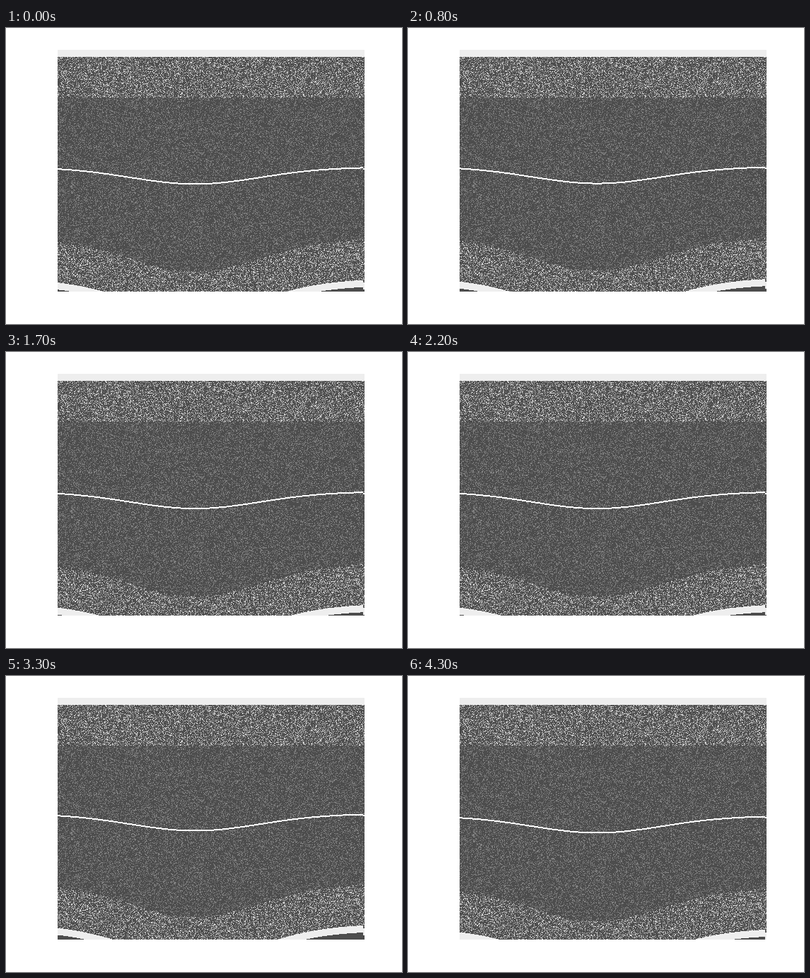
These frames come from a looping animation (560x420 px, 4400 ms). A matplotlib script:

```python
import numpy as np
import matplotlib.pyplot as plt
from matplotlib.animation import FuncAnimation

W, H, DPI = 560, 420, 100
LEFT, RIGHT, TOP, BOTTOM = 73, 507, 31, 374
WALL_TOP, LUMEN_TOP, BAND = 41, 99, 10
DARK, LIGHT = 77, 238
STEP = 0.75        # lower wall travel per level, in pixels
REST_LEVEL = 5
BEAT = 30          # frames per heartbeat

x = np.arange(LEFT, RIGHT)
y = np.arange(TOP, BOTTOM)[:, None]

# Resting centre line of the vessel: a smooth sag
centre = 197.5 + 23.8 * np.exp(-((x - 267) / 131) ** 2)
centre[-2:] = centre[0]  # the last column wraps round

speckle = np.random.default_rng(4).random((H, len(x)))
wall_tone = DARK + (LIGHT - DARK) * np.clip((speckle - 0.6) / 0.38, 0, 1)
lumen_tone = np.where(speckle < 0.77, DARK, 130)


def ramp(t, start, end):
    return np.clip((t - start) / (end - start), 0, 1)


def level_at(frame):
    """Wall level: quick contraction, slow filling, then a small notch."""
    t = frame % BEAT
    contraction = 5 * ramp(t, 0, 3)
    filling = 2 * ramp(t, 4, 6) + 6 * ramp(t, 7, 13)
    notch = 2 * ramp(t, 16, 18) - ramp(t, 21, 22)
    return np.round(REST_LEVEL - contraction + filling - notch)


def render(frame):
    shift = STEP * (level_at(frame) - REST_LEVEL)
    line = centre + shift / 2
    lumen_end = np.round(2 * line - LUMEN_TOP + 2)
    wall_end = np.round(2 * line - WALL_TOP + 2)

    # Tissue stretches linearly from the fixed upper wall to the lower one
    stretch = np.clip((y - LUMEN_TOP) / (lumen_end - LUMEN_TOP), 0, 1)
    rows = y - np.round(shift * stretch).astype(int)
    cols = x - LEFT
    in_lumen = (y >= LUMEN_TOP) & (y < lumen_end)
    image = np.where(in_lumen, lumen_tone[rows, cols], wall_tone[rows, cols])

    image[(y < WALL_TOP) | (y >= wall_end)] = LIGHT
    image[y >= wall_end + BAND] = DARK
    line_top = np.round(line - 1)
    image[(y >= line_top) & (y < line_top + 2)] = 255

    stage = np.full((H, W), 255.0)
    stage[TOP:BOTTOM, LEFT:RIGHT] = image
    return stage


fig = plt.figure(figsize=(W / DPI, H / DPI), dpi=DPI, facecolor="white")
ax = fig.add_axes([0, 0, 1, 1])
ax.axis("off")
picture = ax.imshow(render(0), cmap="gray", vmin=0, vmax=255,
                    interpolation="nearest", aspect="auto")


def update(frame):
    picture.set_data(render(frame))
    return [picture]


anim = FuncAnimation(fig, update, frames=44, interval=100, repeat=True,
                     repeat_delay=0, blit=False)
plt.show()
```
